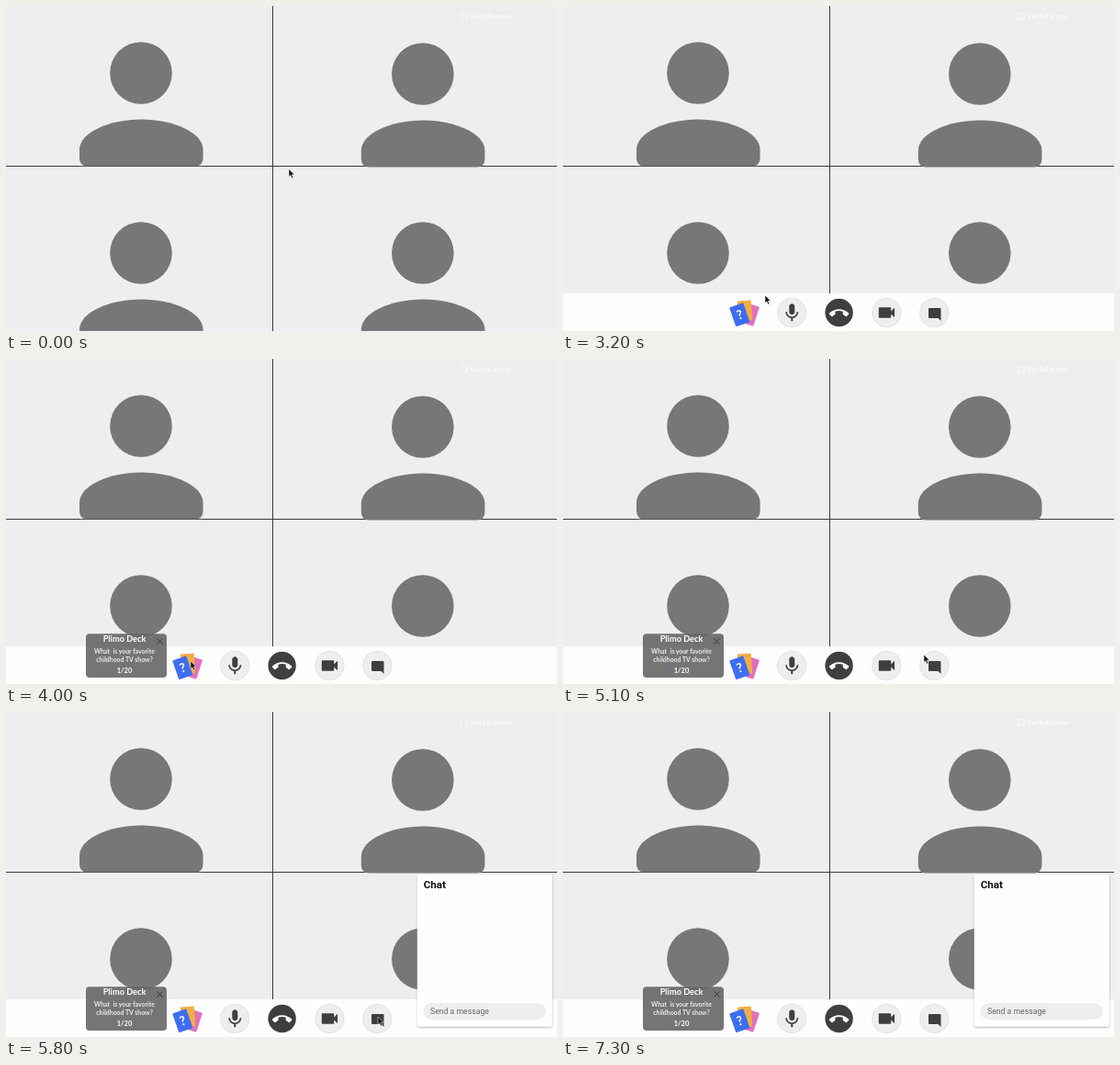
An HTML page for the animation above (7.8 s loop, 600 by 354 pixels).

```html
<!DOCTYPE html>
<html lang="en">
<head>
<meta charset="utf-8">
<title>Video call</title>
<style>
  html, body { margin: 0; width: 100%; height: 100%; overflow: hidden; background: #efedf0; }
  svg { display: block; width: 600px; height: 354px; }
  .label { font-family: Lato, sans-serif; font-weight: 700; text-anchor: middle; fill: #fff; }
  .chat { font-family: Roboto, sans-serif; }
</style>
</head>
<body>
<svg viewBox="0 0 600 354">
  <defs>
    <g id="person" fill="#787678">
      <circle cx="67" cy="33.5" r="33.8"/>
      <path d="M0 117C0 98 33 84 67.300 84S134.600 98 134.600 117V126Q134.600 135 126 135H8.600Q0 135 0 126Z"/>
    </g>
    <filter id="shadow" x="-10%" y="-10%" width="120%" height="120%">
      <feDropShadow dx="0" dy="1" stdDeviation="1.200" flood-opacity=".35"/>
    </filter>
  </defs>

  <rect width="600" height="354" fill="#efedf0"/>
  <path d="M290.500 0V354M0 174.500H600" stroke="#3a383a"/>
  <use href="#person" x="80" y="39.500"/>
  <use href="#person" x="386.800" y="40.500"/>
  <use href="#person" x="80" y="235.500"/>
  <use href="#person" x="386.800" y="235.500"/>
  <path d="M80 174.500H214" stroke="#555355"/>

  <g opacity=".75">
    <rect x="495.500" y="8" width="6.500" height="6.500" rx="1" fill="none" stroke="#fff" stroke-width=".9"/>
    <text class="label" x="528" y="13.800" font-size="6.700">Exit full screen</text>
  </g>

  <g id="bar">
    <rect y="313" width="600" height="41" fill="#fffeff"/>
    <rect x="-7.500" y="-11" width="15" height="22" rx="1" fill="#e070bd" transform="translate(203.500 336) rotate(18)"/>
    <rect x="-7.500" y="-11" width="15" height="22" rx="1" fill="#f3ae42" transform="translate(198 332) rotate(-4)"/>
    <g transform="translate(192.300 336.300) rotate(-19)">
      <rect x="-8" y="-11" width="16" height="22" rx="1" fill="#3d6df0"/>
      <text class="label" y="5" font-size="14">?</text>
    </g>
    <g fill="#efedf0" stroke="#dfdde0" stroke-width=".8">
      <circle cx="249.200" cy="334" r="15.800"/>
      <circle cx="352.400" cy="334" r="15.800"/>
      <circle cx="404.300" cy="334" r="15.800"/>
    </g>
    <circle cx="300.600" cy="334" r="15.200" fill="#403e41"/>
    <g fill="#403e41">
      <path transform="translate(237.300 322.300)" d="M12 14c1.660 0 3-1.340 3-3V5c0-1.660-1.340-3-3-3S9 3.340 9 5v6c0 1.660 1.340 3 3 3zm5.300-3c0 3-2.540 5.100-5.300 5.100S6.700 14 6.700 11H5c0 3.410 2.720 6.230 6 6.720V21h2v-3.280c3.280-.48 6-3.300 6-6.720z"/>
      <path transform="translate(340.900 322.500) scale(.96)" d="M17 10.500V7c0-.55-.45-1-1-1H4c-.55 0-1 .45-1 1v10c0 .55.450 1 1 1h12c.55 0 1-.45 1-1v-3.500l4 4v-11z"/>
      <path d="M399 329H410.500Q411.500 329 411.500 330V343L408.500 340H399Q398 340 398 339V330Q398 329 399 329Z"/>
    </g>
    <path fill="#fff" transform="translate(289.800 324) scale(.9)" d="M12 9c-1.600 0-3.150.250-4.600.720v3.100c0 .39-.23.740-.56.900-1 .49-1.900 1.120-2.700 1.850-.4.370-1 .37-1.400 0L.29 13.080c-.39-.38-.39-1.030 0-1.410C3.340 8.780 7.460 7 12 7s8.660 1.780 11.710 4.670c.39.380.390 1.030 0 1.410l-2.480 2.490c-.4.370-1 .37-1.400 0-.8-.73-1.700-1.360-2.670-1.850-.33-.16-.56-.5-.56-.9v-3.100C15.150 9.250 13.600 9 12 9z"/>
  </g>

  <g id="card">
    <rect x="87" y="299.200" width="88" height="47.800" rx="4" fill="#686668" opacity=".9"/>
    <text class="label" x="129" y="308" font-size="9.200">Plimo Deck</text>
    <g opacity=".85">
      <text class="label" x="129" y="321" font-size="6.900">What&nbsp; is your favorite</text>
      <text class="label" x="129" y="330" font-size="6.900">childhood TV show?</text>
    </g>
    <text class="label" x="129" y="341.800" font-size="7.500">1/20</text>
    <path d="M117 336.500L114.500 339L117 341.500M141.500 336.500L144 339L141.500 341.500" fill="none" stroke="#58769f"/>
    <path d="M164.500 304.500L170.500 310.500M170.500 304.500L164.500 310.500" stroke="#353335"/>
  </g>

  <g id="chat" class="chat">
    <rect x="447.800" y="177" width="147" height="165.500" rx="2" fill="#fffeff" filter="url(#shadow)"/>
    <text x="454.700" y="192.200" font-size="11.600" font-weight="700" fill="#111">Chat</text>
    <rect x="454.500" y="317" width="133.500" height="18" rx="9" fill="#efedf0"/>
    <text x="462" y="329.300" font-size="8.700" fill="#686668">Send a message</text>
  </g>

  <path id="cursor" d="M0 0V8.500L1.900 6.800L3.300 10L4.800 9.400L3.400 6.200H6Z" fill="#111" stroke="#fff" stroke-width=".5"/>
</svg>
<script>
const LOOP = 7800, STEP = 100;
const $ = id => document.getElementById(id);
const start = performance.now();

// Pointer waypoints: time, x, y
const path = [
  [2700, 308, 177.5], [3000, 257, 272], [3200, 220, 315], [3400, 197, 336],
  [3500, 202, 334], [3700, 201, 329], [4300, 201, 329], [4400, 213, 313],
  [4500, 255, 286], [4600, 312, 277], [4700, 357, 288], [4800, 378, 304],
  [4900, 378, 304], [5100, 393, 322], [5300, 402, 331], [5700, 405, 332],
  [6900, 405, 332], [7000, 399, 285], [7100, 388, 160], [7200, 374, 13]
];

function pointAt(t) {
  const i = path.findIndex(p => p[0] >= t);
  if (i < 0) return path[path.length - 1].slice(1);
  if (i === 0) return path[0].slice(1);
  const [t0, x0, y0] = path[i - 1], [t1, x1, y1] = path[i];
  const k = (t - t0) / (t1 - t0);
  return [x0 + (x1 - x0) * k, y0 + (y1 - y0) * k];
}

function show(id, on) {
  $(id).setAttribute("visibility", on ? "visible" : "hidden");
}

function draw() {
  const now = (performance.now() - start) % LOOP;
  const t = Math.floor(now / STEP) * STEP;
  show("bar", t >= 2000);
  show("card", t >= 4000);
  show("chat", t >= 5800);
  show("cursor", t < 7300);
  $("cursor").setAttribute("transform", `translate(${pointAt(t)})`);
  requestAnimationFrame(draw);
}
draw();
</script>
</body>
</html>
```
